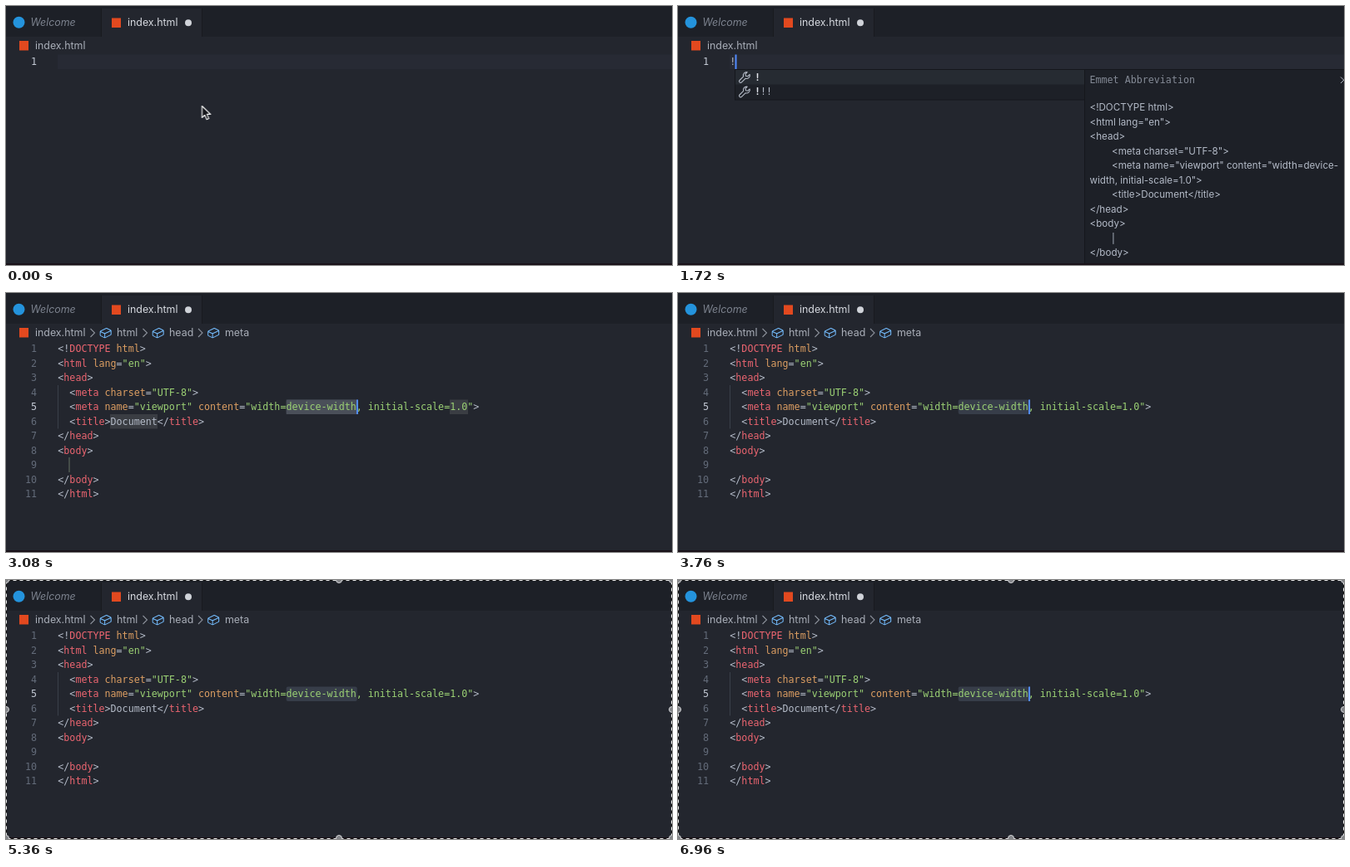
Animation of 800 by 312 pixels, one loop 7 s. Source, as an HTML page:

```html
<!DOCTYPE html>
<html lang="en">
<head>
<meta charset="UTF-8">
<title>Abbreviation in an editor</title>
<style>
  html, body { margin: 0; width: 100%; height: 100%; overflow: hidden; background: #23262e; }
  svg { display: block; }
  text { white-space: pre; fill: #b4bbc8; }
  .ui { font: 12.4px Inter, "Open Sans", sans-serif; }
  .mono { font: 11.68px "DejaVu Sans Mono", "Liberation Mono", monospace; }
  .num { text-anchor: end; fill: #636b79; }
  .num.on { fill: #c3c9d4; }
  .crumb text { fill: #a9aeb8; }
  .preview { font-style: italic; fill: #7d838f; }
  .doc { font-size: 11.6px; }
  .tag { fill: #ec6570; }
  .attr { fill: #dc9e62; }
  .str { fill: #9bd174; }
  .caret { fill: #528bff; }

  /* One loop: 7000 ms, 1% = 70 ms */
  .t { animation: 7s step-end infinite; opacity: 0; }
  .start { animation-name: start; }
  .pointer { animation-name: pointer; }
  .typed { animation-name: typed; }
  .list { animation-name: list; }
  .detail { animation-name: detail; }
  .code { animation-name: code; }
  .fields { animation-name: fields; }
  .path { animation-name: path; }
  .frame { animation-name: frame; }
  .c1 { animation-name: c1; }
  .c2 { animation-name: c2; }
  .c3 { animation-name: c3; }
  @keyframes start { 0% { opacity: 1 } 27.42%, 100% { opacity: 0 } }
  @keyframes pointer { 0% { opacity: 1 } 9.71%, 100% { opacity: 0 } }
  @keyframes typed { 0% { opacity: 0 } 9.71% { opacity: 1 } 27.42%, 100% { opacity: 0 } }
  @keyframes list { 0% { opacity: 0 } 10.28% { opacity: 1 } 27.42%, 100% { opacity: 0 } }
  @keyframes detail { 0% { opacity: 0 } 10.85% { opacity: 1 } 27.42%, 100% { opacity: 0 } }
  @keyframes code { 0% { opacity: 0 } 27.42%, 100% { opacity: 1 } }
  @keyframes fields { 0% { opacity: 0 } 27.42% { opacity: 1 } 52%, 100% { opacity: 0 } }
  @keyframes path { 0% { opacity: 0 } 33.14%, 100% { opacity: 1 } }
  @keyframes frame { 0% { opacity: 0 } 74.28%, 100% { opacity: 1 } }
  @keyframes c1 { 0% { opacity: 0 } 5.14% { opacity: 1 } 9.71%, 100% { opacity: 0 } }
  @keyframes c2 {
    0%, 17.71% { opacity: 0 }
    9.71%, 24.57% { opacity: 1 }
    27.42%, 100% { opacity: 0 }
  }
  @keyframes c3 {
    0%, 34.28%, 48.57%, 59.14%, 73.42%, 87.71% { opacity: 0 }
    27.42%, 41.42%, 52%, 66.28%, 80.57%, 94.85%, 100% { opacity: 1 }
  }
</style>
</head>
<body>
<svg width="800" height="312" viewBox="0 0 800 312">
  <defs>
    <path id="cube" fill="#75beff" d="M14.45 4.5l-5-2.5h-.9l-7 3.5-.55.89v4.5l.55.9 5 2.5h.9l7-3.5.55-.9v-4.5l-.55-.89zm-8 8.64l-4.5-2.25V7.17l4.5 2v3.97zm.5-4.8L2.29 6.23l6.66-3.34 4.67 2.34-6.67 3.11zm7 1.55l-6.5 3.25V9.21l6.5-3v3.68z"/>
    <path id="chevron" fill="none" stroke="#8b909a" stroke-width="1.1" d="M-2.5-5L2.5 0L-2.5 5"/>
    <path id="wrench" fill="none" stroke="#b4bac6" stroke-width="1.1" stroke-linejoin="round" d="M10.2 1.2A4 4 0 0 0 5.6 6.4L1 11a1.6 1.6 0 0 0 2.4 2.4L8 8.8A4 4 0 0 0 13.2 4L10.8 6.2L8.4 5.8L8 3.5Z"/>
  </defs>

  <rect width="800" height="312" fill="#23262e"/>

  <!-- Tabs -->
  <rect width="800" height="37" fill="#1d2027"/>
  <rect x="115" y="3" width="120" height="34" fill="#23262e"/>
  <path d="M114.5 3V37M235.5 3V37" stroke="#181a1f"/>
  <circle cx="15.5" cy="19.7" r="7" fill="#2493dc"/>
  <text class="ui preview" x="29.5" y="24.3">Welcome</text>
  <rect x="127" y="14.5" width="11" height="11.5" fill="#e2491f"/>
  <text class="ui" x="146" y="24.3" style="fill:#d7dae0">index.html</text>
  <circle cx="219" cy="20.2" r="4" fill="#d0d3d9"/>

  <!-- Breadcrumbs -->
  <g class="ui crumb">
    <rect x="16" y="42" width="11" height="11.5" fill="#e2491f"/>
    <text x="35" y="52.4">index.html</text>
    <g class="t path">
      <use href="#chevron" x="104" y="48"/>
      <use href="#cube" x="111.7" y="40"/>
      <text x="133" y="52.4">html</text>
      <use href="#chevron" x="167" y="48"/>
      <use href="#cube" x="174.7" y="40"/>
      <text x="196" y="52.4">head</text>
      <use href="#chevron" x="233.5" y="48"/>
      <use href="#cube" x="241.2" y="40"/>
      <text x="263" y="52.4">meta</text>
    </g>
  </g>

  <!-- Empty file -->
  <g class="t start mono">
    <rect x="62" y="58.5" width="738" height="17.5" fill="#272a34"/>
    <text class="num on" x="37" y="71.2">1</text>
  </g>
  <text class="t typed mono" x="62.3" y="71.2">!</text>
  <rect class="t c1 caret" x="62.5" y="58.5" width="2" height="17.5"/>
  <rect class="t c2 caret" x="68.5" y="58.5" width="2" height="17.5"/>

  <!-- Suggestions -->
  <g class="t list mono">
    <rect x="68.5" y="76.5" width="420" height="36.5" fill="#1d2027" stroke="#15171c"/>
    <rect x="69" y="77" width="419" height="17.5" fill="#262b32"/>
    <use href="#wrench" x="73" y="78.5"/>
    <use href="#wrench" x="73" y="96"/>
    <text x="92" y="89.8" font-weight="bold" style="fill:#e3e6ec">!</text>
    <text x="92" y="107.3"><tspan font-weight="bold" fill="#e3e6ec">!</tspan>!!</text>
  </g>
  <g class="t detail">
    <rect x="488.5" y="76.5" width="320" height="240" fill="#1d2027" stroke="#15171c"/>
    <text class="mono" x="494.5" y="93.4" style="fill:#848a96">Emmet Abbreviation</text>
    <path d="M796 85.5L803.5 93M796 93L803.5 85.5" stroke="#b4bac6"/>
    <g class="ui doc" id="doc"></g>
  </g>

  <!-- Expanded code -->
  <g class="t code mono">
    <path d="M62.5 111V163.5" stroke="#3a3f49"/>
    <rect x="336.7" y="128.5" width="85" height="17.5" rx="2" fill="#373d49"/>
    <g class="t fields">
      <path fill="#3a3d43" d="M125 146H182V163.5H125ZM533 128.5H555V146H533Z"/>
      <rect x="336.7" y="128.5" width="85" height="17.5" fill="#4a4f59"/>
      <path d="M76 198V216" stroke="#505a52" stroke-width="1.5"/>
    </g>
    <g id="lines"></g>
  </g>
  <rect class="t c3 caret" x="421" y="128.5" width="2" height="17.5"/>

  <!-- Mouse pointer -->
  <path class="t pointer" transform="translate(235.5 120)" fill="#16171b" stroke="#fff" stroke-width="1.1" stroke-linejoin="round" d="M0 .5V14.5L3.3 11.4L5.6 16.7L8.2 15.6L5.9 10.4H10.2Z"/>

  <rect y="310" width="800" height="2" fill="#1a1219"/>

  <!-- Capture frame -->
  <g class="t frame">
    <rect x=".5" y=".5" width="799" height="311" fill="none" stroke="#111"/>
    <rect x=".5" y=".5" width="799" height="311" fill="none" stroke="#e6e6e6" stroke-dasharray="4 4"/>
    <g fill="#84868a" stroke="#d4d5d8" id="grips"></g>
  </g>
</svg>
<script>
  const LINE = 17.5;
  const byId = id => document.getElementById(id);

  function add(parent, name, attrs, text = "") {
    const el = document.createElementNS("http://www.w3.org/2000/svg", name);
    for (const key in attrs) el.setAttribute(key, attrs[key]);
    el.textContent = text;
    return parent.appendChild(el);
  }

  const source = [
    '<!DOCTYPE html>',
    '<html lang="en">',
    '<head>',
    '  <meta charset="UTF-8">',
    '  <meta name="viewport" content="width=device-width, initial-scale=1.0">',
    '  <title>Document</title>',
    '</head>',
    '<body>',
    '',
    '</body>',
    '</html>'
  ];

  // Colours one line of markup, token by token
  function highlight(el, line) {
    let inTag = false, prev = "";
    for (const token of line.match(/"[^"]*"|<[!\/]?|>|=|[\w-]+|\s+/g) || []) {
      let kind = "plain";
      if (token[0] === "<") inTag = true;
      else if (token === ">") inTag = false;
      else if (token[0] === '"') kind = "str";
      else if (/\w/.test(token) && inTag) kind = prev[0] === "<" ? "tag" : "attr";
      add(el, "tspan", { class: kind }, token);
      prev = token;
    }
  }

  source.forEach((line, i) => {
    const y = 71.2 + i * LINE;
    add(byId("lines"), "text", { class: i === 4 ? "num on" : "num", x: 37, y }, i + 1);
    highlight(add(byId("lines"), "text", { x: 62.3, y }), line);
  });

  // Preview text: the same markup, wrapped at the panel edge
  const preview = source.flatMap((line, i) =>
    i === 4 ? [line.slice(0, line.indexOf("width, ")), line.slice(line.indexOf("width, "))]
    : i === 8 ? ["  |"] : [line]);
  preview.forEach((line, i) => {
    const x = line.startsWith("  ") ? 521 : 494.5;
    add(byId("doc"), "text", { x, y: 126.4 + i * LINE }, line.trim());
  });

  for (const cx of [0, 400, 800])
    for (const cy of [0, 156, 311])
      if (cx !== 400 || cy !== 156) add(byId("grips"), "circle", { cx, cy, r: 3.5 });
</script>
</body>
</html>
```
